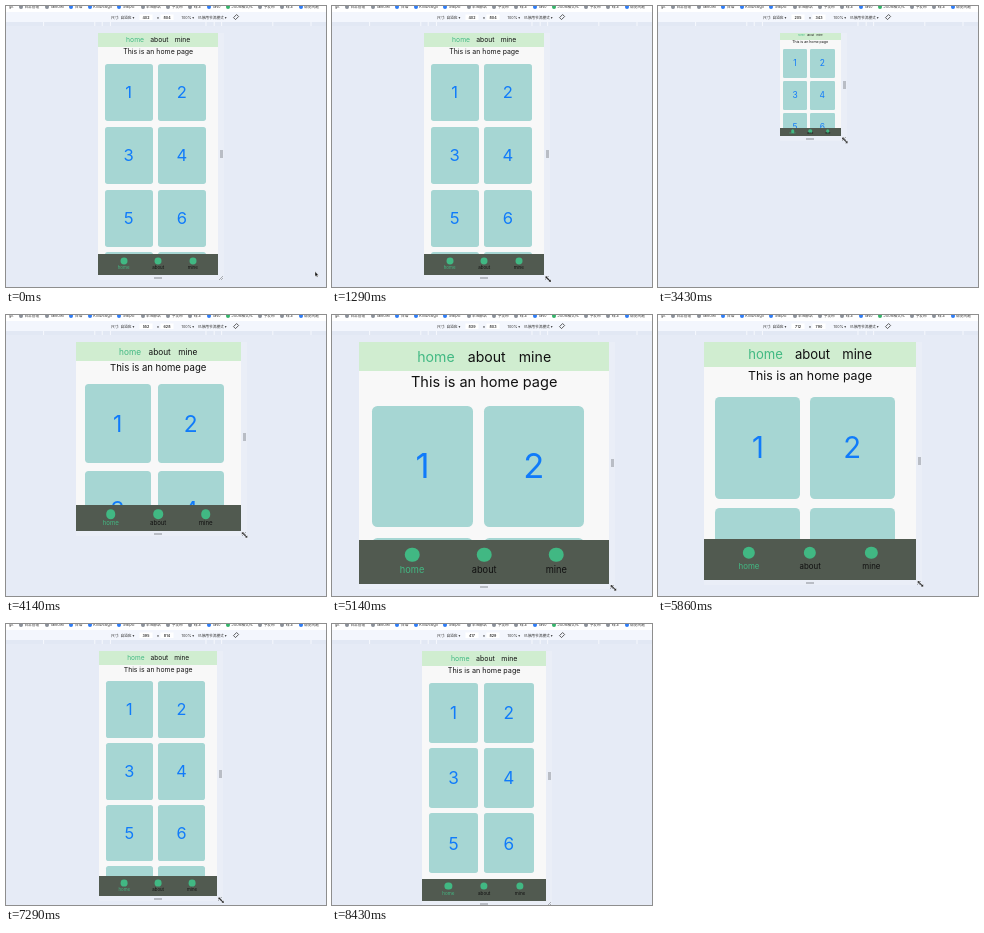
An HTML page for the animation above (9430 ms loop, 320 by 281 pixels).

```html
<!DOCTYPE html>
<html lang="en">
<head>
<meta charset="utf-8">
<title>Responsive page preview</title>
<style>
html, body { margin: 0; width: 100%; height: 100%; overflow: hidden; }
body { position: relative; background: #e6ebf6; font-family: Inter, Roboto, sans-serif; color: #111; }
.tools, #marks, #frame, #cursor { position: absolute; left: 0; top: 0; }
.tools, #marks { font: 3.7px/4px Inter, "Noto Sans CJK SC", "Noto Sans CJK", sans-serif; color: #333; }
.tools { fill: #333; }
.tools .num { text-anchor: middle; font-weight: 500; fill: #111; }
#marks { top: -.6px; padding-left: 3px; display: flex; gap: 11px; white-space: nowrap; }
#marks span { position: relative; }
#marks span::before {
  content: ""; position: absolute; left: -5.5px; top: 0;
  width: 4px; height: 4px; border-radius: 50%; background: var(--c);
}
#frame {
  left: calc(152.2px - var(--w) / 2); top: 27px;
  width: var(--w); height: var(--h);
}
#frame > * { position: absolute; }
.edge { background: #eaeef7; }
.edge.right { left: 100%; top: 0; width: 6px; height: calc(100% + 5px); }
.edge.bottom { left: 0; top: 100%; width: 100%; height: 5px; }
.grip { background: #b9bdc5; }
.grip.right { left: calc(100% + 2px); top: calc(50% - 4px); width: 3px; height: 8px; }
.grip.bottom { left: calc(50% - 4px); top: calc(100% + 2px); width: 8px; height: 2px; }
.corner { left: calc(100% + 1px); top: calc(100% + 1px); }
.page { inset: 0; overflow: hidden; background: #f8f8f8; }
.page > * { position: absolute; }
nav {
  left: 0; top: 0; width: 100%; height: calc(var(--w) * .117);
  display: flex; justify-content: center; align-items: center;
  gap: calc(var(--n) * .052); background: #d0edd0;
  font-size: calc(var(--n) * .0565); line-height: 1;
}
.on { color: #42b983; }
.title {
  left: 0; width: 100%; top: calc(var(--w) * .128); line-height: calc(var(--w) * .064);
  text-align: center; white-space: nowrap; font-size: calc(var(--w) * .058);
}
.cards {
  left: calc(var(--w) * .054); top: calc(var(--w) * .257);
  display: grid; grid-template-columns: repeat(2, calc(var(--w) * .4));
  grid-auto-rows: calc(var(--w) * .48);
  gap: calc(var(--w) * .044);
}
.cards div {
  display: flex; align-items: center; justify-content: center;
  border-radius: calc(var(--w) * .022); background: #a6d6d3; color: #107bfa;
  font-size: calc(var(--w) * .138); line-height: 1;
}
.tabs { left: 0; bottom: 0; width: 100%; height: calc(var(--n) * .176); background: #515a50; }
.tabs div { position: absolute; left: calc(50% + var(--i) * var(--w) * .288); top: 0; }
.tabs i, .tabs span { position: absolute; transform: translate(-50%, -50%); }
.tabs i {
  top: calc(var(--n) * .059); width: calc(var(--w) * .058); height: calc(var(--w) * .058);
  border-radius: 50%; background: #41b883;
}
.tabs span { top: calc(var(--n) * .119); font-size: calc(var(--w) * .037); line-height: 1; }
#cursor { overflow: visible; }
</style>
</head>
<body>
<svg class="tools" width="320" height="22">
  <rect width="320" height="16" fill="#f3f6fd"/>
  <rect width="320" height="6" fill="#fff"/>
  <rect y="16" width="320" height="4" fill="#e2e8f4"/>
  <g id="sizes"></g>
  <path d="M133.500 8.500h13V14h-13zM154.500 8.500h13V14h-13z" fill="#fff"/>
  <g transform="translate(0 12.600)">
    <text x="105">尺寸: 自适应 ▾</text>
    <text class="num" id="wide" x="140"></text>
    <text class="num" x="152">×</text>
    <text class="num" id="high" x="161"></text>
    <text x="175.500">100% ▾</text>
    <text x="192">已停用节流模式 ▾</text>
  </g>
  <rect x="228.700" y="8.800" width="2.800" height="4.400" transform="rotate(45 230 11)" fill="none" stroke="#444" stroke-width=".8"/>
</svg>
<div id="marks"></div>
<div id="frame">
  <div class="edge right"></div>
  <div class="edge bottom"></div>
  <div class="grip right"></div>
  <div class="grip bottom"></div>
  <svg class="corner" width="5" height="5"><path d="M0 4L4 0M2 4L4 2" stroke="#8d9096" stroke-width=".7"/></svg>
  <div class="page">
    <nav><span class="on">home</span><span>about</span><span>mine</span></nav>
    <div class="title">This is an home page</div>
    <div class="cards"></div>
    <div class="tabs">
      <div style="--i:-1"><i></i><span class="on">home</span></div>
      <div style="--i:0"><i></i><span>about</span></div>
      <div style="--i:1"><i></i><span>mine</span></div>
    </div>
  </div>
</div>
<svg id="cursor" width="1" height="1">
  <path id="arrow" d="M-1 -2.500V2.500L.2 1.500L1 3.200L1.900 2.800L1.100 1.200H2.600Z" fill="#111" stroke="#fff" stroke-width=".4"/>
  <path id="resize" d="M-2.800 -2.800H-.4L-1.200 -2L2 1.200L2.800 .4V2.800H.4L1.200 2L-2 -1.200L-2.800 -.4Z" fill="#111" stroke="#fff" stroke-width=".3"/>
</svg>
<script>
const $ = id => document.getElementById(id);
const LOOP = 9430, STEP = 1000 / 7, LAST = 59;
const GRAB = 1140, RELEASE = 7710, LAG = 130;
const SX = .2985, SY = .3012, MID = 152.2, TOP = 27;

// Drag path of the viewport: time, width, height
const drag = [
  [0, 402, 804],
  [1290, 402, 804],
  [2000, 298, 569],
  [3290, 150, 260],
  [3430, 206, 344],
  [4140, 551, 627],
  [4900, 839, 803],
  [5290, 839, 803],
  [5710, 785, 790],
  [6570, 357, 789],
  [RELEASE, 417, 829]
];

const blue = "#2f7df6", gray = "#8a8f98", green = "#35b36a";
const marks = [
  ["git", "none"], ["日常管理", gray], ["TalkOwl", gray], ["日语", blue],
  ["KilnDesign", blue], ["Swiper", blue], ["本地静站", gray], ["予发布", gray],
  ["线上", gray], ["Tavo", blue], ["JSON格式化", green], ["予发布", gray],
  ["线上", gray], ["请览问题", blue]
];
$("marks").innerHTML = marks.map(([label, c]) => `<span style="--c:${c}">${label}</span>`).join("");

// Edges of the preset device widths
$("sizes").innerHTML = [1024, 768, 425, 375, 320].flatMap(size => [-size, size]).map(d =>
  `<rect x="${MID + d * SX / 2 - .5}" y="16" width="1" height="4" fill="#f6f8fd"/>`).join("");

document.querySelector(".cards").innerHTML =
  Array.from({ length: 10 }, (_, i) => `<div>${i + 1}</div>`).join("");

const clamp = v => Math.min(1, Math.max(0, v));
const mix = (a, b, p) => a + (b - a) * p;

function sizeAt(t) {
  const i = drag.findIndex(k => k[0] > t);
  if (i < 0) return drag[drag.length - 1].slice(1);
  if (i === 0) return drag[0].slice(1);
  const [t0, w0, h0] = drag[i - 1], [t1, w1, h1] = drag[i];
  const p = (t - t0) / (t1 - t0);
  return [mix(w0, w1, p), mix(h0, h1, p)];
}

function draw(now) {
  const t = Math.min(LAST, Math.floor((now % LOOP + 3) / STEP)) * STEP;
  const [w, h] = sizeAt(t);
  const [late] = sizeAt(t - LAG); // nav and tabs trail the resize
  const style = $("frame").style;
  style.setProperty("--w", w * SX + "px");
  style.setProperty("--h", h * SY + "px");
  style.setProperty("--n", late * SX + "px");
  $("wide").textContent = Math.round(w);
  $("high").textContent = Math.round(h);

  const reach = clamp((t - STEP) / (GRAB - STEP));
  const x = mix(310, MID + w * SX / 2 + 4, reach);
  const y = mix(268, TOP + h * SY + 4, reach);
  $("cursor").style.transform = `translate(${x}px, ${y}px)`;
  $("cursor").style.display = t > RELEASE ? "none" : "";
  $("arrow").style.display = reach < 1 ? "" : "none";
  $("resize").style.display = reach < 1 ? "none" : "";
}

const start = performance.now();
function loop() {
  draw(performance.now() - start);
  requestAnimationFrame(loop);
}
loop();
</script>
</body>
</html>
```
